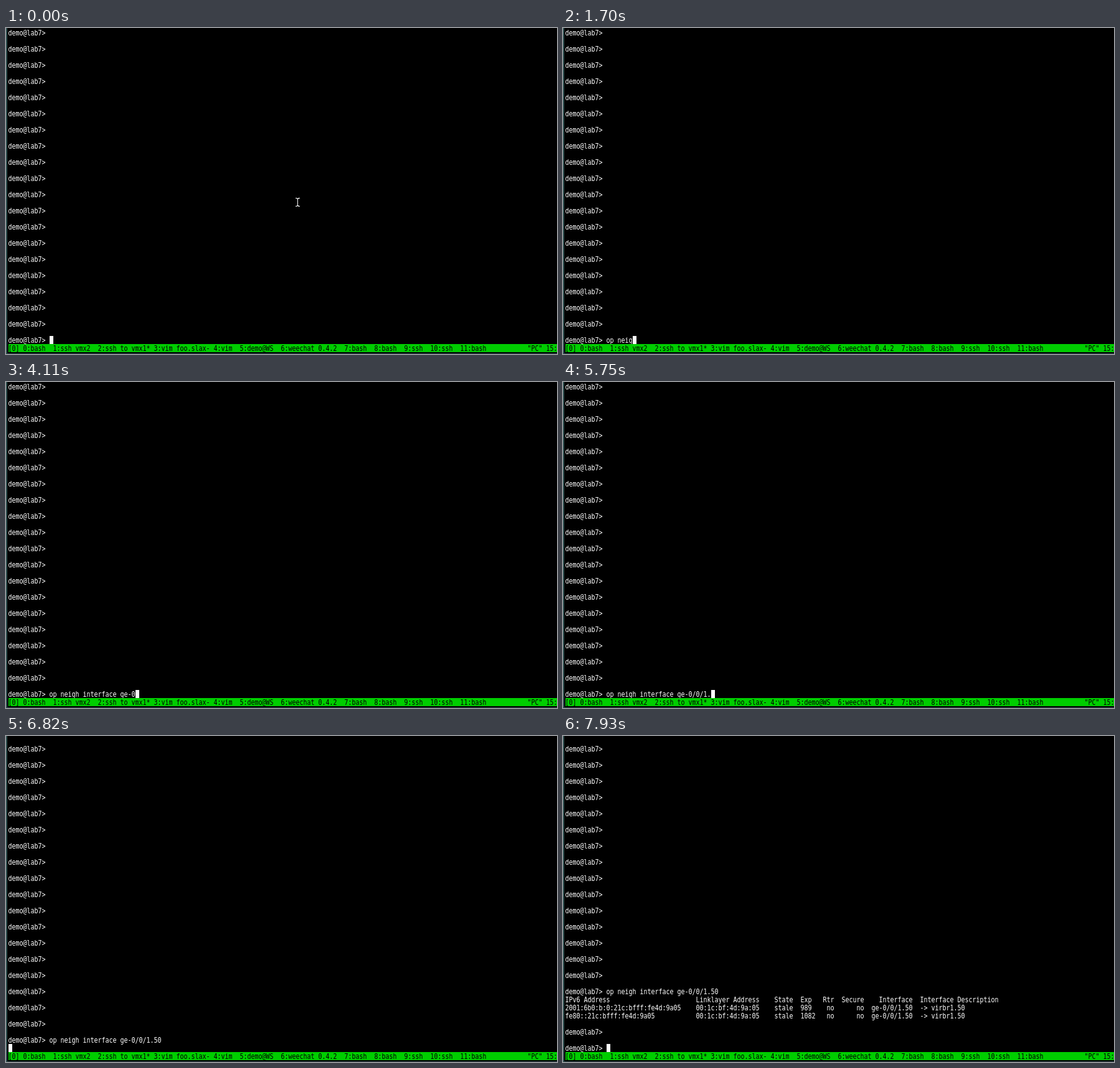
Write an HTML page with a canvas that moves like this. It is 885x524 px and loops after 9860 ms.

```html
<!DOCTYPE html>
<html lang="en">
<head>
<meta charset="utf-8">
<title>Terminal session</title>
<style>
  html, body { margin: 0; width: 100%; height: 100%; overflow: hidden; background: #000; }
  canvas { display: block; }
</style>
</head>
<body>
<canvas id="screen" width="885" height="524"></canvas>
<script>
const ctx = document.getElementById('screen').getContext('2d');

const LOOP = 9860;
const WIDTH = 885, HEIGHT = 524;
const CELL_W = 6, CELL_H = 13, LEFT = 4, TOP = 1, ROWS = 39;
const FRAME = '#2f4f4f';
const PROMPT = 'demo@lab7> ';
const COMMAND = 'op neigh interface ge-0/0/1.50 ';
const STATUS = ('[0] 0:bash  1:ssh vmx2  2:ssh to vmx1* 3:vim foo.slax- 4:vim  5:demo@WS  ' +
  '6:weechat 0.4.2  7:bash  8:bash  9:ssh  10:ssh  11:bash').padEnd(139) + '"PC" 15:';

// [time, number of command characters visible from then on]
const KEYS = [
  [990, 1], [1130, 2], [1244, 3], [1358, 4], [1472, 5], [1586, 6], [1700, 7],
  [1900, 8], [2030, 10], [2200, 11], [2280, 12], [2490, 19], [3220, 20],
  [3430, 21], [3770, 22], [4110, 23], [4380, 24], [4640, 25], [4940, 26],
  [5500, 27], [5750, 28], [5990, 29], [6180, 30], [6780, 31],
];
const ENTER = 6820, OUTPUT = 6910, DONE = 6990, SECOND_ENTER = 7930;
const POINTER_MOVE = 40, POINTER_HIDE = 950;

const tableRow = (ip, mac, state, exp, rtr, secure, iface, description) =>
  ip.padEnd(35) + mac.padEnd(21) + state.padEnd(7) + exp.padEnd(6) +
  rtr.padStart(3) + secure.padStart(8) + iface.padStart(13) + '  ' + description;

const neighbor = (ip, exp) =>
  tableRow(ip, '00:1c:bf:4d:9a:05', 'stale', exp, 'no', 'no', 'ge-0/0/1.50', '-> virbr1.50');

const TABLE = [
  tableRow('IPv6 Address', 'Linklayer Address', 'State', 'Exp', 'Rtr', 'Secure',
    'Interface', 'Interface Description'),
  neighbor('2001:6b0:b:0:21c:bfff:fe4d:9a05', '989'),
  neighbor('fe80::21c:bfff:fe4d:9a05', '1082'),
];

const HISTORY = Array.from({ length: ROWS - 1 }, (_, i) => i % 2 ? '' : PROMPT);

function linesAt(t) {
  const typed = KEYS.reduce((count, [time, chars]) => t >= time ? chars : count, 0);
  const lines = [...HISTORY, PROMPT + COMMAND.slice(0, typed)];
  if (t >= OUTPUT) lines.push(...TABLE);
  if (t >= ENTER) lines.push('');
  if (t >= DONE) lines.push(PROMPT);
  if (t >= SECOND_ENTER) lines.push('', PROMPT);
  return lines.slice(-ROWS);
}

function rect(color, x, y, w, h) {
  ctx.fillStyle = color;
  ctx.fillRect(x, y, w, h);
}

// Terminal cells are taller than the font's own proportions.
function drawLine(text, row, color) {
  ctx.fillStyle = color;
  ctx.save();
  ctx.translate(LEFT - 0.5, TOP + row * CELL_H + 11);
  ctx.scale(1, 1.23);
  [...text].forEach((char, i) => {
    if (char !== ' ') ctx.fillText(char, i * CELL_W, 0);
  });
  ctx.restore();
}

function drawPointer(x, y) {
  for (const edge of [y, y + 13]) {
    rect('#fff', x, edge, 3, 1);
    rect('#fff', x + 4, edge, 3, 1);
  }
  rect('#fff', x + 2, y + 1, 3, 1);
  rect('#fff', x + 3, y + 2, 1, 10);
  rect('#fff', x + 2, y + 12, 3, 1);
}

function draw(t) {
  rect('#000', 0, 0, WIDTH, HEIGHT);
  rect(FRAME, 0, 0, 2, HEIGHT);
  rect(FRAME, 0, HEIGHT - 1, WIDTH, 1);
  ctx.font = '10px "DejaVu Sans Mono", monospace';

  const lines = linesAt(t);
  lines.forEach((line, row) => drawLine(line, row, '#fff'));
  const column = lines[ROWS - 1].length;
  rect('#fff', LEFT + column * CELL_W, TOP + (ROWS - 1) * CELL_H, CELL_W, CELL_H);

  rect('#00cd00', LEFT, TOP + ROWS * CELL_H, WIDTH - LEFT, CELL_H);
  drawLine(STATUS, ROWS, '#000');

  if (t < POINTER_MOVE) drawPointer(465, 273);
  else if (t < POINTER_HIDE) drawPointer(470, 267);
}

const start = performance.now();
function tick() {
  draw((performance.now() - start) % LOOP);
  requestAnimationFrame(tick);
}
tick();
</script>
</body>
</html>
```
